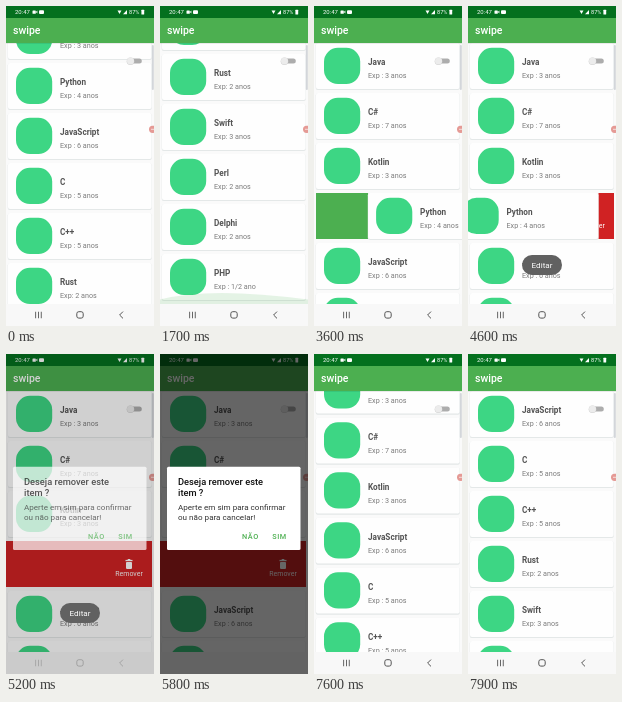
An HTML page with a canvas for the animation above (8 s loop, 148x320 px).

```html
<!DOCTYPE html>
<html lang="pt">
<head>
<meta charset="utf-8">
<title>swipe</title>
<style>
html, body { margin: 0; width: 100%; height: 100%; overflow: hidden; background: #fafafa; }
canvas { display: block; width: 148px; height: 320px; }
</style>
</head>
<body>
<canvas id="stage"></canvas>
<script>
const W = 148, H = 320, LOOP = 8000, STEP = 100;
const TOP = 37, BOTTOM = 298, PITCH = 50, CARD_H = 46;
const GREEN = '#4caf50', RED = '#d02223', REMOVED = 3;
const canvas = document.getElementById('stage');
const ctx = canvas.getContext('2d');
const dpr = window.devicePixelRatio || 1;
canvas.width = W * dpr;
canvas.height = H * dpr;

const items = [
  ['Java', 'Exp : 3 anos'], ['C#', 'Exp : 7 anos'], ['Kotlin', 'Exp : 3 anos'],
  ['Python', 'Exp : 4 anos'], ['JavaScript', 'Exp : 6 anos'], ['C', 'Exp : 5 anos'],
  ['C++', 'Exp : 5 anos'], ['Rust', 'Exp: 2 anos'], ['Swift', 'Exp: 3 anos'],
  ['Perl', 'Exp: 2 anos'], ['Delphi', 'Exp: 2 anos'], ['PHP', 'Exp : 1/2 ano']
];

// Each track is a list of [time, value] keys.
const tracks = {
  scroll: [[1000, 130], [1650, 339], [1950, 339], [2380, 0], [7500, 0], [7900, 150]],
  glowBottom: [[1500, 0], [1700, 1], [1900, 0]],
  glowTop: [[2200, 0], [2400, 1], [3000, 0]],
  swipe: [[3400, 0], [3900, 148], [4000, 148], [4300, 0], [4500, 0], [4600, -15.5], [5000, -150]],
  toast: [[3900, 0], [4200, 1], [5700, 1], [5800, 0]],
  dim: [[5100, 0], [5200, 0.18], [5400, 0.6], [5900, 0.6], [6200, 0]],
  dialog: [[5100, 0], [5200, 0.7], [5400, 1], [5900, 1], [6200, 0]],
  collapse: [[6400, 0], [6700, 1]]
};

function value(name, t) {
  const keys = tracks[name];
  if (t <= keys[0][0]) return keys[0][1];
  for (let i = 1; i < keys.length; i++) {
    const [t0, a] = keys[i - 1], [t1, b] = keys[i];
    if (t <= t1) {
      const p = (t - t0) / (t1 - t0);
      return a + (b - a) * p * p * (3 - 2 * p);
    }
  }
  return keys[keys.length - 1][1];
}

function box(x, y, w, h, color, r = 0) {
  ctx.fillStyle = color;
  ctx.beginPath();
  ctx.roundRect(x, y, w, h, r);
  ctx.fill();
}

function disc(x, y, r, color) {
  ctx.fillStyle = color;
  ctx.beginPath();
  ctx.arc(x, y, r, 0, Math.PI * 2);
  ctx.fill();
}

function poly(points, color) {
  ctx.fillStyle = color;
  ctx.beginPath();
  points.forEach(([x, y]) => ctx.lineTo(x, y));
  ctx.fill();
}

function text(str, x, y, size, color, weight = 400, align = 'left') {
  ctx.font = `${weight} ${size}px Roboto, sans-serif`;
  ctx.textAlign = align;
  ctx.fillStyle = color;
  ctx.fillText(str, x, y);
}

function drawCard(x, y, [name, exp]) {
  box(x + 1.7, y + 0.3, 144.2, CARD_H + 0.8, '#e4e8e8', 2);
  box(x + 2, y, 143.6, CARD_H, '#fefefe', 2);
  box(x + 10, y + 4.8, 36.2, 36.2, '#3dd684', 14);
  text(name, x + 54, y + 22.3, 8.2, '#545454', 700);
  text(exp, x + 54, y + 35, 7.2, '#7c7c7c');
}

function drawBin(y) {
  box(119.5, y + 18.9, 7, 1.3, '#fff');
  box(121.7, y + 18, 2.6, 1.2, '#fff');
  box(120, y + 20.9, 6, 7, '#fff', 0.8);
  text('Remover', 123, y + 34.5, 7, '#fff', 400, 'center');
}

function drawSwipeRow(y, dx, item) {
  if (dx < 0) {
    ctx.save();
    ctx.beginPath();
    ctx.rect(Math.max(0, 146 + dx), y, W, CARD_H);
    ctx.clip();
    box(0, y, 146, CARD_H, RED);
    drawBin(y);
    ctx.restore();
  } else if (dx > 0) {
    box(2, y, Math.min(dx, 144), CARD_H, GREEN);
  }
  if (Math.abs(dx) < W) drawCard(dx, y, item);
}

// The overscroll arc leans towards the finger at peakX.
function drawGlow(edge, dir, peakX, depth, amount) {
  if (!amount) return;
  ctx.save();
  ctx.globalAlpha = 0.14 * amount;
  ctx.fillStyle = GREEN;
  ctx.beginPath();
  ctx.moveTo(0, edge);
  ctx.lineTo(0, edge + dir * depth * 0.4 * amount);
  ctx.quadraticCurveTo(peakX, edge + dir * depth * 1.6 * amount, W, edge + dir * depth * 0.4 * amount);
  ctx.lineTo(W, edge);
  ctx.fill();
  ctx.restore();
}

function drawList(t) {
  const scroll = value('scroll', t), dx = value('swipe', t), gone = value('collapse', t);
  ctx.save();
  ctx.beginPath();
  ctx.rect(0, TOP, W, BOTTOM - TOP);
  ctx.clip();
  items.forEach((item, i) => {
    const y = TOP + i * PITCH - scroll - (i > REMOVED ? gone * PITCH : 0);
    if (y > BOTTOM || y + PITCH < TOP) return;
    if (i !== REMOVED) drawCard(0, y, item);
    else if (!gone) drawSwipeRow(y, dx, item);
  });
  drawGlow(TOP, 1, 100, 17, value('glowTop', t));
  drawGlow(BOTTOM, -1, 50, 11, value('glowBottom', t));
  box(0, TOP, W, 1, 'rgba(0,0,0,.08)');
  ctx.restore();
}

function drawOverlays() {
  box(123, 52.6, 12.8, 5, '#adadad', 2.5);
  disc(124.5, 55.3, 3.8, '#cfcfcf');
  disc(124.5, 54.9, 3.5, '#ececec');
  box(145.8, 39, 2, 45, '#d3d6da', 1);
  disc(146.6, 123.3, 3.6, '#e59a95');
  box(145, 122.8, 3, 1, '#f6dcda');
}

function drawNav(iconAlpha) {
  box(0, BOTTOM, W, H - BOTTOM, '#f8f8f8');
  ctx.save();
  ctx.globalAlpha = iconAlpha;
  for (let i = 0; i < 3; i++) box(29.2 + i * 2.8, 305.8, 0.9, 6.4, '#555');
  ctx.strokeStyle = '#555';
  ctx.lineWidth = 1;
  ctx.beginPath();
  ctx.roundRect(70.8, 305.7, 6.4, 6.4, 2);
  ctx.moveTo(117, 305.6);
  ctx.lineTo(113.6, 309);
  ctx.lineTo(117, 312.4);
  ctx.stroke();
  ctx.restore();
}

function drawBars() {
  box(0, 0, W, 12, '#04701e');
  box(0, 12, W, TOP - 12, GREEN);
  text('swipe', 7, 28, 10.5, '#fff', 500);
  text('20:47', 9, 8.3, 6, '#fff');
  box(26.5, 4.4, 3.3, 3.4, '#fff', 0.6);
  poly([[29.8, 6], [31.4, 4.6], [31.4, 7.6]], '#fff');
  box(33, 4.2, 5, 3.8, '#fff', 1);
  poly([[111.5, 4.6], [115.5, 4.6], [113.5, 8]], '#fff');
  poly([[117, 8.2], [121, 8.2], [121, 4]], '#fff');
  text('87%', 123, 8.2, 5.6, '#fff');
  box(135.4, 3.7, 2.8, 4.7, '#fff', 0.5);
}

function drawDialog(t) {
  const alpha = value('dialog', t);
  if (!alpha) return;
  box(0, 0, W, H, `rgba(0,0,0,${value('dim', t)})`);
  ctx.save();
  ctx.globalAlpha = alpha;
  box(7, 112.7, 133.5, 83.3, '#fff', 1.5);
  text('Deseja remover este', 18, 130.8, 9.3, '#111', 500);
  text('item ?', 18, 142.2, 9.3, '#111', 500);
  text('Aperte em sim para confirmar', 18, 156.2, 8.1, '#333');
  text('ou não para cancelar!', 18, 165.8, 8.1, '#333');
  ctx.letterSpacing = '0.6px';
  text('NÃO', 82, 185.2, 7.3, GREEN, 500);
  text('SIM', 112.2, 185.2, 7.3, GREEN, 500);
  ctx.letterSpacing = '0px';
  ctx.restore();
}

function drawToast(t) {
  ctx.save();
  ctx.globalAlpha = value('toast', t);
  box(54, 249, 40, 20, '#616161', 10);
  text('Editar', 74, 261.8, 8.1, '#fff', 400, 'center');
  ctx.restore();
}

function frame(now) {
  const t = Math.floor((now % LOOP) / STEP) * STEP;
  ctx.setTransform(dpr, 0, 0, dpr, 0, 0);
  box(0, 0, W, H, '#fafafa');
  drawList(t);
  drawOverlays();
  drawBars();
  drawNav(1 - value('dialog', t));
  drawDialog(t);
  drawToast(t);
  requestAnimationFrame(frame);
}
requestAnimationFrame(frame);
</script>
</body>
</html>
```
